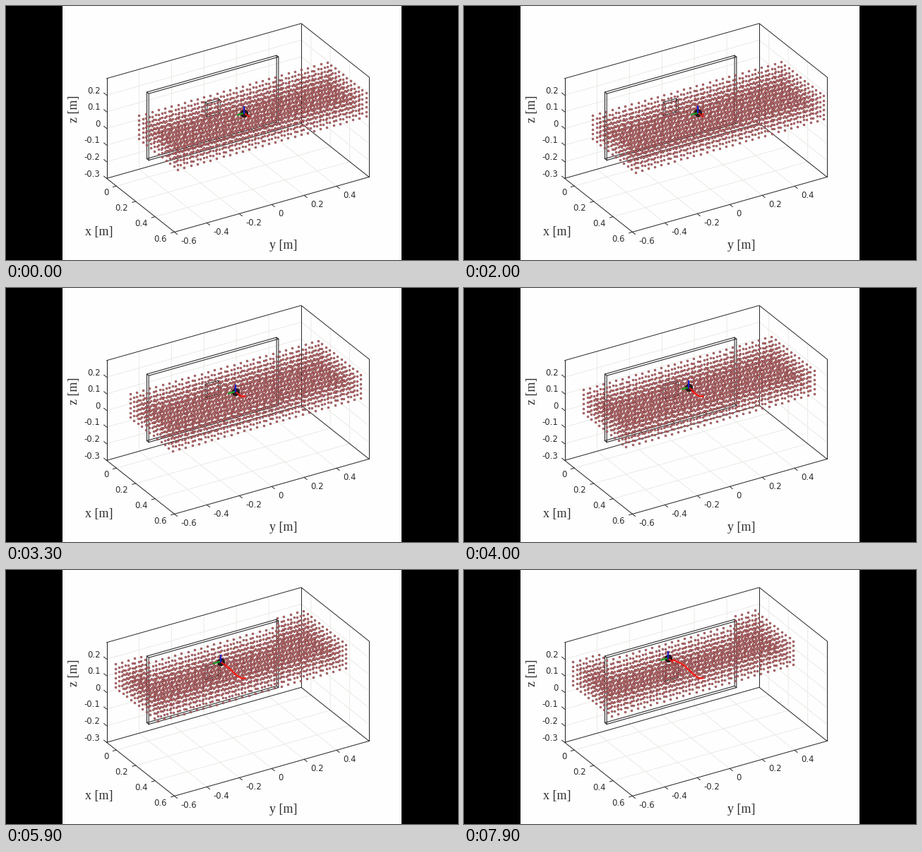
Recreate the animation shown at these times as a matplotlib script. Size 640 px wide and 360 px high, loop 8 s.

```python
import numpy as np
import matplotlib.pyplot as plt
from matplotlib.animation import FuncAnimation
from matplotlib.patches import Rectangle

W, H, DPI = 640, 360, 100
FRAMES, STEP = 80, 100
PX = 72 / DPI                       # points per pixel
INK, GRID = "#2b2b2b", "#eaeae6"

fig = plt.figure(figsize=(W / DPI, H / DPI), dpi=DPI, facecolor="black")
ax = fig.add_axes([0, 0, 1, 1])
ax.set_xlim(0, W)
ax.set_ylim(H, 0)
ax.axis("off")
ax.add_patch(Rectangle((80, 0), 480, H, fc="#fefefe", ec="none", zorder=0))

# Orthographic view: screen vectors of one metre along each axis
ORIGIN = np.array([294.0, 145.4])
BASIS = np.array([[137.1, 108.6], [229.6, -65.0], [0.0, -236.0]])
X0, X1, Y0, Y1, Z0, Z1 = -0.1, 0.6, -0.6, 0.6, -0.3, 0.3


def project(p):
    return ORIGIN + np.asarray(p, float) @ BASIS


def path(points, color=INK, width=1.0, z=2):
    q = project(points)
    ax.plot(q[:, 0], q[:, 1], color=color, lw=width * PX, zorder=z,
            solid_joinstyle="miter")


def tick(p, d, value, shift, ha):
    a = project(p)
    v = np.array(d) @ BASIS
    b = a + 5 * v / np.hypot(*v)
    ax.plot(*zip(a, b), color=INK, lw=PX, zorder=2)
    ax.text(*(a + shift + [0, 4.2]), f"{value:.1f}" if value else "0",
            ha=ha, va="baseline", family="DejaVu Sans", size=11.6 * PX,
            color=INK)


def slab(half_w, half_h):
    loops = []
    for x in (-0.02, 0.0):
        loop = [(x, -half_w, -half_h), (x, half_w, -half_h),
                (x, half_w, half_h), (x, -half_w, half_h)]
        path(loop + loop[:1], width=1.1, z=2.5)
        loops.append(loop)
    for pair in zip(*loops):
        path(pair, width=1.1, z=2.5)


# Grid and ticks
for v in np.arange(4) / 5:
    path([(v, Y0, Z0), (v, Y1, Z0), (v, Y1, Z1)], GRID, z=1)
    tick((v, Y0, Z0), (0, -1, 0), v, (-10.5, 9), "right")
for v in np.arange(-3, 3) / 5:
    path([(X1, v, Z0), (X0, v, Z0), (X0, v, Z1)], GRID, z=1)
    tick((X1, v, Z0), (1, 0, 0), v, (9, 12.5), "left")
for v in np.arange(-3, 3) / 10:
    path([(X0, Y0, v), (X0, Y1, v), (X1, Y1, v)], GRID, z=1)
    tick((X0, Y0, v), (-1, 0, 0), v, (-9, -7), "right")

# Box edges
for zz in (Z0, Z1):
    path([(X0, Y0, zz), (X0, Y1, zz), (X1, Y1, zz)])
path([(X0, Y0, Z0), (X1, Y0, Z0), (X1, Y1, Z0)])
for x, y in ((X0, Y0), (X0, Y1), (X1, Y1)):
    path([(x, y, Z0), (x, y, Z1)])

for x, y, s, r in ((132, 321, "x [m]", 0), (393, 340, "y [m]", 0),
                   (97, 146, "z [m]", 90)):
    ax.text(x, y, s, rotation=r, ha="center", va="center", color=INK,
            family="Liberation Serif", size=18 * PX)

PANEL_W = 0.4
slab(PANEL_W, 0.2)
slab(0.04, 0.04)

# Position keys: time in s, x, y; height stays constant
KEYS = np.array([
    [0.0, 0.286, 0.018],
    [2.0, 0.272, 0.000],
    [3.3, 0.228, -0.003],
    [4.8, 0.113, 0.004],
    [5.9, 0.072, -0.001],
    [6.7, 0.038, -0.011],
    [7.9, 0.011, -0.030],
])
HEIGHT = 0.1
SLOPES = np.gradient(KEYS[:, 1:], KEYS[:, 0], axis=0)


def position(t):
    """Cubic Hermite interpolation through the keys."""
    k = int(np.clip(np.searchsorted(KEYS[:, 0], t, "right") - 1,
                    0, len(KEYS) - 2))
    h = KEYS[k + 1, 0] - KEYS[k, 0]
    u = (t - KEYS[k, 0]) / h
    xy = ((1 + 2 * u) * (1 - u) ** 2 * KEYS[k, 1:]
          + u * (1 - u) ** 2 * h * SLOPES[k]
          + u * u * (3 - 2 * u) * KEYS[k + 1, 1:]
          + u * u * (u - 1) * h * SLOPES[k + 1])
    return [*xy, HEIGHT]


POS = np.array([position(i * STEP / 1000) for i in range(FRAMES)])
TRACK = project(POS)

# Point cloud carried by the moving body
CLOUD = np.stack(np.meshgrid(0.105 + np.linspace(-0.22, 0.22, 12),
                             np.linspace(-0.58, 0.58, 30),
                             0.022 + np.linspace(-0.07, 0.07, 6),
                             indexing="ij"), -1).reshape(-1, 3)

dots, = ax.plot([], [], "o", ms=2.6 * PX, mew=0.75 * PX, mfc="#d98580",
                mec="#77343a", zorder=3)
trail, = ax.plot([], [], color="#f5201a", lw=2.4 * PX, zorder=6)
body, = ax.plot([], [], "o", ms=10 * PX, mfc="#2a1a1a", mec="#151010",
                mew=PX, zorder=7)
ARMS = [((0.05, 0, 0), "#d81818"), ((0, -0.04, 0), "#18a020"),
        ((0, 0, 0.038), "#1c1cc8")]
arms = [ax.plot([], [], color=c, lw=2.2 * PX, zorder=8)[0] for _, c in ARMS]


def visible(p):
    """Inside the axes box and not behind the panel."""
    x, y = p[:, 0], p[:, 1]
    inside = (x >= X0) & (x <= X1) & (y >= Y0) & (y <= Y1)
    return inside & ~((x < 0) & (np.abs(y) < PANEL_W))


def draw(i):
    pts = CLOUD + POS[i]
    dots.set_data(*project(pts[visible(pts)]).T)
    trail.set_data(*(TRACK[:i + 1] + [1, 1.5]).T)
    body.set_data(TRACK[i:i + 1, 0], TRACK[i:i + 1, 1])
    for line, (d, _) in zip(arms, ARMS):
        line.set_data(*project([POS[i], POS[i] + d]).T)
    return [dots, trail, body, *arms]


anim = FuncAnimation(fig, draw, frames=FRAMES, interval=STEP, repeat=True,
                     repeat_delay=0, blit=False)
plt.show()
```
